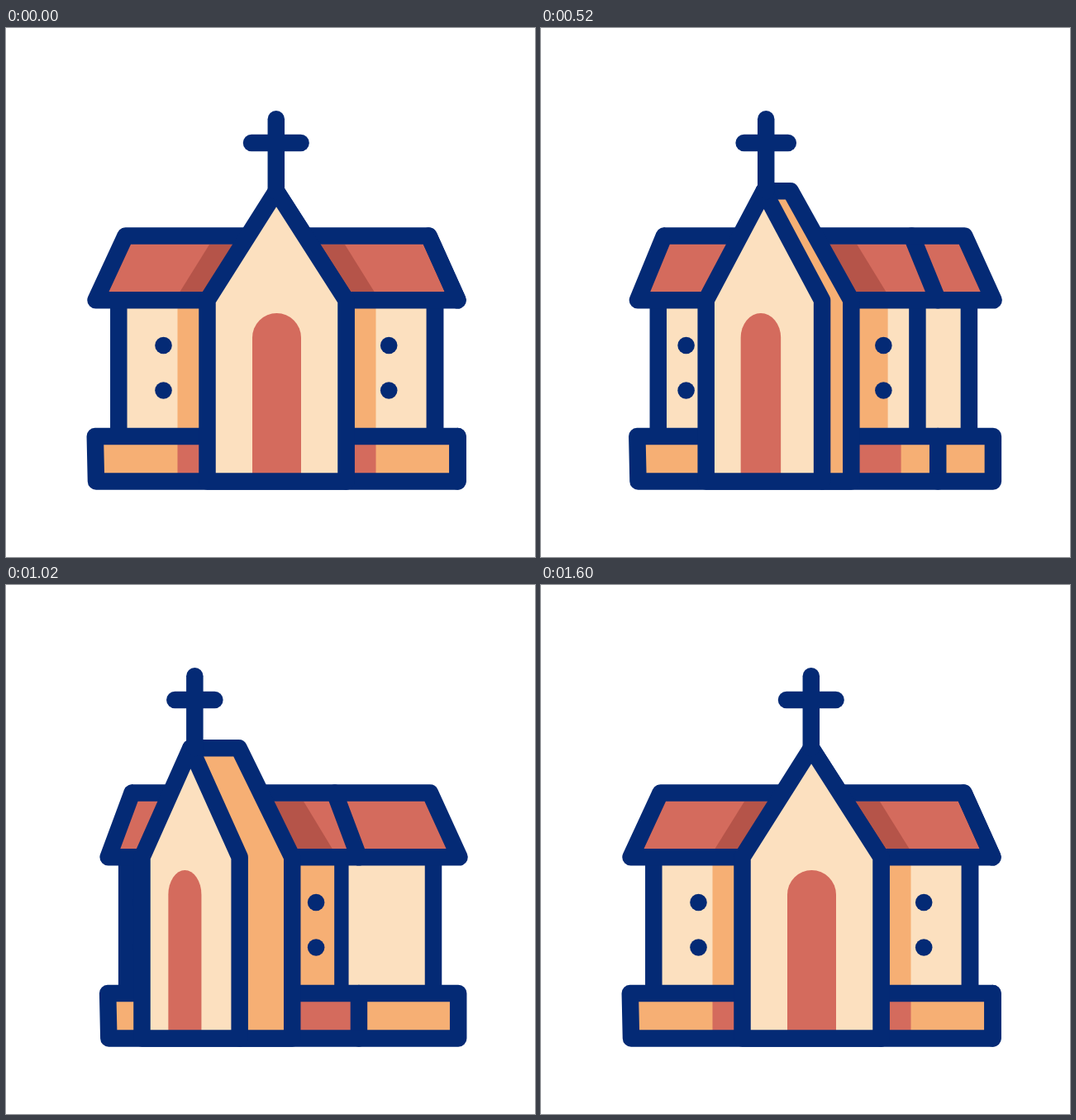
An HTML page with a canvas for the animation above (1.82 s loop, 640 px wide and 640 px high).

```html
<!DOCTYPE html>
<html lang="en">
<head>
<meta charset="utf-8">
<title>Turning church</title>
<style>
  html, body { margin: 0; width: 100%; height: 100%; overflow: hidden; background: #fff; }
  canvas { display: block; width: 640px; height: 640px; }
</style>
</head>
<body>
<canvas id="stage" width="640" height="640"></canvas>
<script>
const ctx = document.getElementById('stage').getContext('2d');
const NAVY = '#042a75', CREAM = '#fce0bf', ORANGE = '#f6af74', RED = '#d46b5d', SHADE = '#b55449';
const LOOP = 1820, MOVE = 600, TURN = 200, RETURN = 1000;
// Heights of the horizontal edges
const APEX = 197.2, RIDGE = 251.5, EAVES = 329.3, PLINTH = 494, GROUND = 548.5;

function trace(points) {
  ctx.beginPath();
  for (let i = 0; i < points.length; i += 2) ctx.lineTo(points[i], points[i + 1]);
}

function fill(color, ...points) {
  trace(points);
  ctx.fillStyle = color;
  ctx.fill();
}

function line(...points) {
  trace(points);
  ctx.stroke();
}

function box(color, left, top, right, bottom) {
  ctx.fillStyle = color;
  ctx.fillRect(left, top, right - left, bottom - top);
}

function dot(x, y) {
  ctx.beginPath();
  ctx.arc(x, y, 10.3, 0, 2 * Math.PI);
  ctx.fillStyle = NAVY;
  ctx.fill();
}

function ease(x) {
  x = Math.min(1, Math.max(0, x));
  return x * x * (3 - 2 * x);
}

// p = 0: seen from the front, p = 1: turned to the left
function draw(p) {
  const mix = (a, b) => a + (b - a) * p;
  const frontL = mix(243.5, 164.2), frontR = mix(411.5, 282.2), frontTop = mix(327, 223);
  const backR = mix(411.5, 346), backTop = mix(327, 281.5);
  const shadeL = mix(207.5, 182);

  ctx.clearRect(0, 0, 640, 640);
  ctx.lineWidth = 20.5;
  ctx.lineCap = ctx.lineJoin = 'round';
  ctx.strokeStyle = NAVY;

  // Walls
  const postL = mix(136.3, 146.2), postR = mix(519, 517), corner = mix(519, 403.9);
  box(CREAM, postL, EAVES, frontL, PLINTH);
  box(CREAM, backR, EAVES, postR, PLINTH);
  for (const x of [postL, corner, postR]) line(x, EAVES, x, PLINTH);
  box(ORANGE, shadeL, EAVES, frontL, PLINTH);
  box(ORANGE, backR, EAVES, mix(447.5, 397), PLINTH);
  for (const y of [384, 438.5]) {
    dot(mix(190.5, 163.5), y);
    dot(mix(463.2, 374.8), y);
  }

  // Plinth
  const baseL = mix(107.8, 123.2), baseR = mix(546.5, 547.2), baseMid = mix(546.5, 426.5);
  box(ORANGE, baseL, PLINTH, baseR, GROUND);
  box(RED, shadeL, PLINTH, frontL, GROUND);
  box(RED, backR, PLINTH, mix(447.5, 426), GROUND);
  line(baseMid, PLINTH, baseMid, GROUND);
  line(baseL, PLINTH, baseR, PLINTH, baseR, GROUND, baseL + 1.2, GROUND, baseL, PLINTH);

  // Roof
  const ridgeL = mix(144.5, 152.5), ridgeR = mix(511.5, 513);
  const eavesL = mix(108.5, 123.7), eavesR = mix(546.5, 548.5);
  const roof = [ridgeL, RIDGE, ridgeR, RIDGE, eavesR, EAVES, eavesL, EAVES, ridgeL, RIDGE];
  fill(RED, ...roof);
  fill(SHADE, mix(246, 222), 262, frontTop, 262, frontL, 319, mix(210.5, 183), 319);
  fill(SHADE, backTop, 262, mix(410, 360), 262, mix(445.5, 394.5), 319, backR, 319);
  line(mix(511.5, 397.3), RIDGE, mix(546.5, 426.5), EAVES);
  line(...roof);

  // Side of the nave, then its front
  const side = [frontTop, APEX, backTop, APEX, backR, EAVES, backR, GROUND, frontR, GROUND];
  fill(ORANGE, ...side, frontR, EAVES);
  line(...side);
  const front = [frontTop, APEX, frontR, EAVES, frontR, GROUND, frontL, GROUND, frontL, EAVES, frontTop, APEX];
  fill(CREAM, ...front);

  // Door
  const doorX = mix(327.5, 216), doorW = mix(29.5, 20);
  ctx.beginPath();
  ctx.ellipse(doorX, 374.5, doorW, 29.5, 0, Math.PI, 0);
  ctx.lineTo(doorX + doorW, GROUND);
  ctx.lineTo(doorX - doorW, GROUND);
  ctx.fillStyle = RED;
  ctx.fill();
  line(...front);

  // Cross
  const crossX = mix(326.8, 228), arm = mix(29.8, 24);
  line(crossX, 110.2, crossX, APEX);
  line(crossX - arm, 139, crossX + arm, 139);
}

function frame(now) {
  const t = now % LOOP;
  draw(ease((t - TURN) / MOVE) - ease((t - RETURN) / MOVE));
  requestAnimationFrame(frame);
}
requestAnimationFrame(frame);
</script>
</body>
</html>
```
